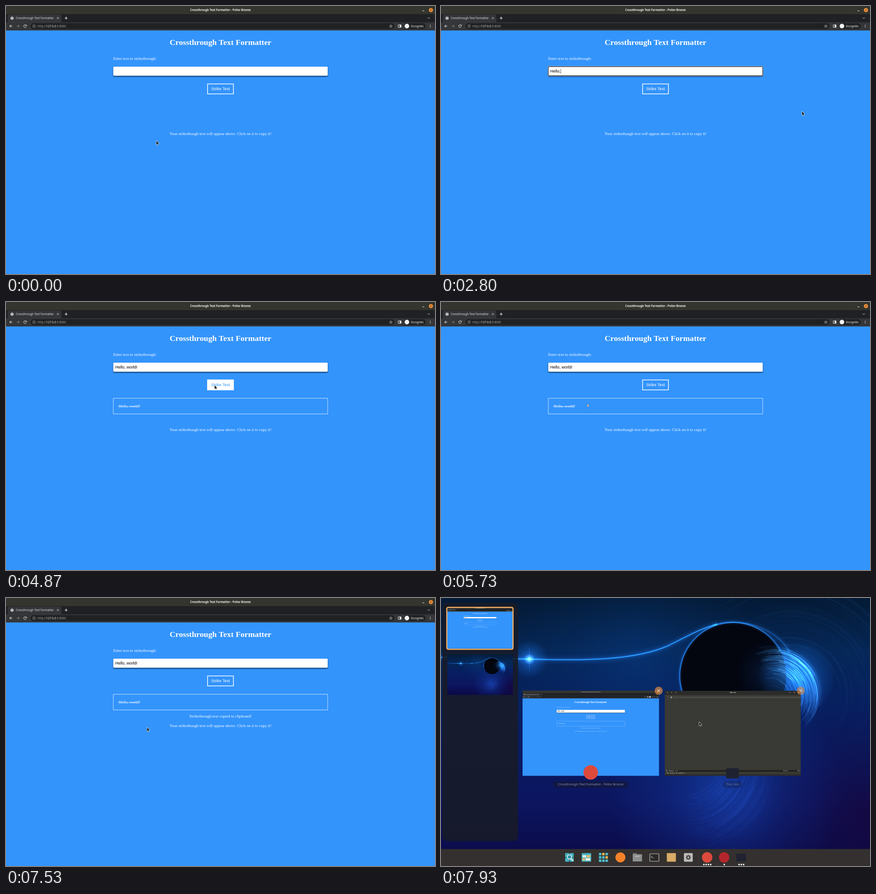
Write an HTML page with a canvas that moves like this. It is 947 px wide and 592 px high and loops after 8000 ms.

```html
<!DOCTYPE html>
<html lang="en">
<head>
<meta charset="utf-8">
<title>Crossthrough Text Formatter</title>
<style>
html, body { margin: 0; width: 100%; height: 100%; overflow: hidden; background: #3394fc; }
canvas { display: block; }
</style>
</head>
<body>
<canvas id="stage" width="947" height="592"></canvas>
<script>
const W = 947, H = 592, LOOP = 8000, TAU = Math.PI * 2;
const K = W / 1920;
const APP = 'Crossthrough Text Formatter';
const WINDOW_TITLE = APP + ' - Pellor Bronze';
const BLUE = '#3394fc', SANS = '"Noto Sans", sans-serif', MONO = '"Noto Sans Mono", monospace';
const BODY = `${18 * K}px "Liberation Serif", serif`;
const FIELD = `${18 * K}px "Liberation Sans", sans-serif`;
const GREETING = 'Hello, world!';
const KEY_TIMES = [2000, 2200, 2270, 2400, 2600, 2800, 2870, 2930, 3070, 3200, 3270, 3400, 3600];
const FOCUS = 730, BLUR = 4800, RESULT = 4870, COPIED = 6330, OVERVIEW = 7570;

const stage = document.getElementById('stage').getContext('2d');
let c = stage;

const clamp = (v, lo = 0, hi = 1) => Math.min(hi, Math.max(lo, v));
const mix = (a, b, p) => a + (b - a) * p;
const smooth = p => p * p * (3 - 2 * p);

function rect(x, y, w, h, fill, r = 0) {
  c.fillStyle = fill;
  c.beginPath();
  c.roundRect(x, y, w, h, r);
  c.fill();
}
function frame(x, y, w, h, color, lw, r = 0) {
  c.strokeStyle = color;
  c.lineWidth = lw;
  c.beginPath();
  c.roundRect(x, y, w, h, r);
  c.stroke();
}
function disc(x, y, r, fill) {
  c.fillStyle = fill;
  c.beginPath();
  c.arc(x, y, r, 0, TAU);
  c.fill();
}
function ring(x, y, r, color, lw, from = 0, to = TAU) {
  c.strokeStyle = color;
  c.lineWidth = lw;
  c.beginPath();
  c.arc(x, y, r, from, to);
  c.stroke();
}
function line(points, color, lw) {
  c.strokeStyle = color;
  c.lineWidth = lw;
  c.beginPath();
  for (let i = 0; i < points.length; i += 2) c.lineTo(points[i], points[i + 1]);
  c.stroke();
}
function text(s, x, y, font, fill, align = 'left') {
  c.font = font;
  c.fillStyle = fill;
  c.textAlign = align;
  c.fillText(s, x, y);
  return c.measureText(s).width;
}
function cross(x, y, s, color, lw) {
  line([x - s, y - s, x + s, y + s], color, lw);
  line([x - s, y + s, x + s, y - s], color, lw);
}
function at(x, y, scale, draw) {
  c.save();
  c.translate(x, y);
  c.scale(scale, scale);
  draw();
  c.restore();
}

// Pointer stops: time, x, y
const PATH = [
  [0, 332, 298], [40, 332, 298], [700, 318, 145], [830, 318, 145], [1330, 797, 233],
  [3950, 797, 233], [4760, 460.5, 184], [5020, 460.5, 184], [5880, 312, 228],
  [6130, 281, 230.5], [6640, 281, 230.5], [7400, 299, 303], [7470, 299.5, 302],
  [7530, 311.5, 286], [7600, 330, 280], [7930, 570, 274], [8000, 570, 274]
];
function pointerAt(t) {
  let i = 1;
  while (i < PATH.length - 1 && t > PATH[i][0]) i++;
  const [a, b] = [PATH[i - 1], PATH[i]];
  const p = smooth(clamp((t - a[0]) / (b[0] - a[0])));
  return { x: mix(a[1], b[1], p), y: mix(a[2], b[2], p) };
}
const inside = (p, x, y, w, h) => p.x > x && p.x < x + w && p.y > y && p.y < y + h;

function drawBrowserFrame() {
  rect(0, 0, W, 18.3, '#34352f');
  text(WINDOW_TITLE, 473.5, 11, '600 6.1px ' + SANS, '#f4f3f0', 'center');
  rect(919.5, 10.2, 4, 1.1, '#f2f2f2');
  disc(938, 9, 4.6, '#f0913a');
  cross(938, 9, 1.5, '#4a3018', 0.8);

  rect(0, 18, W, 18.5, '#202124');
  rect(4, 19, 118, 20, '#35363a', 4);
  disc(13.5, 26.8, 3.4, '#e4e6e9');
  line([11.3, 25, 13, 26.2, 13, 28, 14.5, 29.6], '#35363a', 0.9);
  line([14.2, 24, 14.6, 25.6, 16.6, 26.4], '#35363a', 0.9);
  text(APP, 21.5, 28.9, '6.2px ' + SANS, '#dfe1e5');
  cross(114.5, 26.7, 1.9, '#e8eaed', 0.9);
  line([129.6, 26.7, 136, 26.7], '#f1f3f4', 1.1);
  line([132.8, 23.5, 132.8, 29.9], '#f1f3f4', 1.1);
  line([930.8, 25.5, 933.2, 27.9, 935.6, 25.5], '#e8eaed', 1);

  rect(0, 36, W, 18, '#35363a');
  arrow(11, 44.4, -1, '#f1f3f4');
  arrow(26.5, 44.4, 1, '#85878b');
  ring(42, 44.4, 2.9, '#f1f3f4', 1, 0.5, 5.4);
  line([45.3, 41.2, 45.3, 43.7, 42.8, 43.7], '#f1f3f4', 1);
  rect(54, 38, 803.5, 13, '#202124', 6.5);
  ring(62, 44.4, 3.1, '#b4b7bb', 0.7);
  line([62, 43.9, 62, 46.2], '#b4b7bb', 0.8);
  line([62, 42.4, 62, 43.1], '#b4b7bb', 0.8);
  let x = 69.8;
  for (const [part, color] of [['http://', '#9aa0a6'], ['127.0.0.1', '#f1f3f4'], [':8080', '#9aa0a6']])
    x += text(part, x, 46.7, `${13 * K}px ${SANS}`, color);

  const star = [];
  for (let i = 0; i <= 10; i++) {
    const r = i % 2 ? 1.5 : 3.4, a = i * Math.PI / 5 - Math.PI / 2;
    star.push(849.5 + r * Math.cos(a), 44.6 + r * Math.sin(a));
  }
  line(star, '#d5d7da', 0.7);
  frame(866, 41.7, 6, 5.4, '#f1f3f4', 1);
  rect(869.3, 41.7, 2.9, 5.4, '#f1f3f4');
  rect(878.5, 37.8, 48, 13, '#202124', 6.5);
  disc(885, 44.3, 5.1, '#f1f3f4');
  text('Incognito', 894, 46.6, '6.2px ' + SANS, '#f1f3f4');
  for (const dy of [-2.4, 0, 2.4]) disc(936.5, 44.4 + dy, 0.75, '#f1f3f4');
}
function arrow(x, y, dir, color) {
  line([x - 3 * dir, y, x + 2.8 * dir, y], color, 1);
  line([x, y - 3, x + 3 * dir, y, x, y + 3], color, 1);
}

function drawPage(t, pointer) {
  rect(0, 53.6, W, H - 53.6, BLUE);
  text(APP, 473.5, 86.3, `bold ${36 * K}px "Liberation Serif", serif`, '#fff', 'center');
  text('Enter text to strikethrough:', 236.7, 119.4, BODY, '#fff');

  // Canvas shadows ignore the transform
  const zoom = c.getTransform().a;
  c.save();
  c.shadowColor = 'rgba(0,0,0,.6)';
  c.shadowBlur = 3 * zoom;
  c.shadowOffsetY = 2.2 * zoom;
  rect(236.8, 133.9, 473.4, 20, '#fff', 2);
  c.restore();
  const focused = t >= FOCUS && t < BLUR;
  if (focused) {
    frame(236.8, 133.9, 473.4, 20, '#fff', 2.2, 2);
    frame(236.8, 133.9, 473.4, 20, '#101010', 1.2, 2);
  }
  const typed = KEY_TIMES.filter(k => k <= t);
  const caretX = 241.2 + text(GREETING.slice(0, typed.length), 241.2, 146.7, FIELD, '#000');
  const lastInput = typed.length ? typed[typed.length - 1] : FOCUS;
  if (focused && Math.floor((t - lastInput) / 600) % 2 === 0)
    rect(caretX, 138.8, 0.6, 10, '#000');

  const hover = pointer && inside(pointer, 444.2, 171.6, 58.6, 23.4);
  if (hover) rect(444.2, 171.6, 58.6, 23.4, '#fff');
  frame(444.95, 172.35, 57.1, 21.9, '#fff', 1.5);
  text('Strike Text', 473.5, 186.2, FIELD, hover ? BLUE : '#fff', 'center');

  if (t >= RESULT) {
    frame(236.9, 212.7, 473.2, 34.6, '#fff', 0.75);
    text(GREETING, 248.7, 232.7, BODY, '#fff');
    rect(247, 229.9, 48, 0.7, '#fff');
  }
  if (t >= COPIED) text('Strikethrough text copied to clipboard!', 473.5, 264.4, BODY, '#fff', 'center');
  text('Your strikethough text will appear above. Click on it to copy it!', 473.5, 284.6, BODY, '#fff', 'center');
}
function drawBrowser(t, pointer) {
  drawPage(t, pointer);
  drawBrowserFrame();
}

function drawPointer(p, shape) {
  c.save();
  c.translate(p.x, p.y);
  c.lineJoin = 'round';
  if (shape === 'beam') {
    line([0, -4.5, 0, 4.5], '#fff', 1.6);
    line([0, -4.5, 0, 4.5], '#1a1a1a', 0.8);
    line([-1.6, -4.5, 1.6, -4.5], '#1a1a1a', 0.7);
    line([-1.6, 4.5, 1.6, 4.5], '#1a1a1a', 0.7);
  } else {
    const outline = shape === 'hand'
      ? [0, 0, 0.9, 0.4, 1, 3, 2.6, 3.8, 2.2, 6.4, -0.8, 6.4, -1.7, 4, -0.6, 3.8]
      : [0, 0, 0, 8, 1.8, 6.4, 3.1, 9, 4.3, 8.4, 3.1, 5.9, 5.5, 5.7];
    c.beginPath();
    for (let i = 0; i < outline.length; i += 2) c.lineTo(outline[i], outline[i + 1]);
    c.closePath();
    c.strokeStyle = shape === 'hand' ? '#6b5a58' : '#f2f2f2';
    c.lineWidth = shape === 'hand' ? 0.5 : 1.2;
    c.stroke();
    c.fillStyle = shape === 'hand' ? '#dcb79a' : '#1c1c1c';
    c.fill();
  }
  c.restore();
}

function gradientFill(g, stops) {
  stops.forEach(([at, color]) => g.addColorStop(at, color));
  c.fillStyle = g;
  c.fillRect(0, 0, W, H);
}
function glow(x, y, r, rgb, alpha) {
  gradientFill(c.createRadialGradient(x, y, 0, x, y, r),
    [[0, `rgba(${rgb},${alpha})`], [0.5, `rgba(${rgb},${alpha * 0.35})`], [1, `rgba(${rgb},0)`]]);
}
function arcs(count, draw) {
  for (let i = 0; i < count; i++) {
    const [x, y, r, from, to, color, lw] = draw();
    ring(x, y, r, color, lw, from, to);
  }
}
function makeWallpaper() {
  const canvas = document.createElement('canvas');
  canvas.width = W;
  canvas.height = H;
  c = canvas.getContext('2d');
  let seed = 11;
  const rand = (a = 0, b = 1) => {
    seed = (seed * 16807) % 2147483647;
    return mix(a, b, seed / 2147483647);
  };
  gradientFill(c.createLinearGradient(0, 0, 0, H),
    [[0, '#041a35'], [0.2, '#052656'], [0.42, '#071f60'], [0.75, '#0c1660'], [1, '#0b0945']]);
  glow(430, 130, 260, '10,70,150', 0.35);
  glow(630, 430, 260, '24,75,190', 0.6);
  glow(947, 480, 260, '22,6,60', 0.8);

  c.globalCompositeOperation = 'lighter';
  arcs(60, () => [770, 215, rand(110, 260), rand(-2.3, -1.5), rand(-0.6, 0.6),
    `rgba(40,120,210,${rand(0.015, 0.05)})`, rand(0.4, 1.5)]);
  arcs(90, () => [540, 360, rand(70, 200), rand(-0.2, 0.5), rand(0.8, 1.6),
    `rgba(50,110,220,${rand(0.02, 0.07)})`, rand(0.4, 1.5)]);
  for (const [lw, alpha] of [[20, 0.04], [11, 0.07], [5, 0.14], [2, 0.35], [0.9, 0.4]]) {
    c.strokeStyle = `rgba(45,140,240,${alpha})`;
    c.lineWidth = lw;
    c.beginPath();
    c.moveTo(0, 131);
    c.bezierCurveTo(100, 133, 150, 134, 195, 135);
    c.bezierCurveTo(330, 139, 430, 136, 500, 106);
    c.bezierCurveTo(545, 84, 575, 66, 610, 58);
    c.stroke();
  }
  for (const [lw, alpha] of [[14, 0.04], [6, 0.08], [2, 0.2]]) {
    c.strokeStyle = `rgba(45,140,240,${alpha})`;
    c.lineWidth = lw;
    c.beginPath();
    c.moveTo(600, 60);
    c.bezierCurveTo(660, 40, 740, 65, 770, 120);
    c.stroke();
  }
  glow(195, 135, 42, '40,140,255', 0.5);
  glow(195, 135, 12, '170,225,255', 0.8);
  line([195, 110, 195, 162], 'rgba(70,160,255,.2)', 1);
  c.globalCompositeOperation = 'source-over';

  disc(645, 172, 117, '#03050f');
  glow(725, 165, 75, '12,50,110', 0.5);
  c.globalCompositeOperation = 'lighter';
  for (const [lw, alpha] of [[9, 0.08], [4, 0.16], [1.4, 0.4]])
    ring(645, 172, 118, `rgba(45,140,235,${alpha})`, lw, 2.6, 5.8);
  glow(785, 175, 85, '30,120,215', 0.65);
  arcs(320, () => {
    const spread = Math.sqrt(rand());
    return [735 + rand(-8, 5), 214 + rand(-6, 8), mix(25, 103, spread), rand(-1.95, -0.9), rand(-0.6, 0.75),
      `rgba(60,160,235,${rand(0.03, 0.16)})`, rand(0.4, 1.4)];
  });
  arcs(50, () => {
    const a = rand(-1.5, -0.7);
    return [735, 214, rand(50, 98), a, a + rand(0.15, 0.5), `rgba(150,215,255,${rand(0.1, 0.35)})`, rand(0.4, 1.3)];
  });
  c = stage;
  return canvas;
}
const wallpaper = makeWallpaper();

function drawTerminal(x, y, w) {
  at(x, y, w / 300, () => {
    rect(0, 0, 300, 187.5, '#393935', 1);
    rect(0, 0, 300, 9, '#2b2b29', 1);
    text('Tilix: vim', 150, 5, 'bold 3px ' + SANS, '#ddd', 'center');
    for (const i of [0, 1, 2]) {
      rect(5 + i * 9, 3.2, 2, 1.2, '#aaa');
      rect(275 + i * 10, 3, 1.6, 1.6, '#ccc');
    }
    text('1: vim', 4, 12, '2.4px ' + SANS, '#999');
    rect(14, 12.5, 286, 4.2, '#4a4a45');
    rect(13, 12.5, 2, 4.2, '#b5b5ac');
    text('1', 6, 16, '3.6px ' + MONO, '#b5b5a8');
    rect(0, 175, 300, 4.2, '#22221f');
    text('[No Name] [+]', 1, 178.4, '3.5px ' + MONO, '#deded6');
    text('0,0-1', 262, 178.4, '3.5px ' + MONO, '#deded6');
    text('All', 293, 178.4, '3.5px ' + MONO, '#deded6');
    text('--No lines in buffer--', 1, 182.9, '3.5px ' + MONO, '#deded6');
    rect(0, 184.5, 300, 3, '#2a2a28');
  });
}

const DOCK_ICONS = [
  (x, y) => {
    for (const dx of [-9.5, 0.5]) for (const dy of [-9.5, 0.5]) rect(x + dx, y + dy, 9, 9, '#43b3c2', 1);
    disc(x, y - 1, 5.5, '#e8eef0');
    disc(x, y - 1, 3.8, '#2f8fa0');
    line([x + 3.5, y + 3, x + 8.5, y + 8], '#f2efe8', 2.4);
  },
  (x, y) => {
    rect(x - 10.5, y - 9.5, 21, 19, '#43b3c2', 1.5);
    rect(x - 8.5, y - 5, 8, 5, '#f3eee2');
    rect(x + 1, y - 5, 7.5, 5, '#f5c069');
    rect(x - 8.5, y + 1.5, 5, 5.5, '#f5c069');
    rect(x - 2, y + 1.5, 10.5, 5.5, '#f3eee2');
  },
  (x, y) => {
    for (let i = 0; i < 9; i++)
      rect(x - 10 + (i % 3) * 7.2, y - 10 + Math.floor(i / 3) * 7.2, 5.6, 5.6, i % 4 === 1 ? '#f5b04c' : '#4cbccb', 0.8);
  },
  (x, y) => disc(x, y, 11, '#f5812a'),
  (x, y) => {
    rect(x - 10, y - 9.5, 9, 5, '#6f7372', 1);
    rect(x - 10.3, y - 7, 20.6, 16, '#8c908f', 1);
    rect(x - 5, y - 3.5, 10, 2, '#b7bab9');
  },
  (x, y) => {
    rect(x - 10, y - 8, 20, 16.5, '#2b2928', 1);
    frame(x - 10, y - 8, 20, 16.5, '#c9c8c6', 1.2, 1);
    text('$_', x - 7.5, y + 1, '6px ' + MONO, '#eee');
  },
  (x, y) => rect(x - 10, y - 9.5, 20, 19, '#d9ab68', 1),
  (x, y) => {
    rect(x - 9.7, y - 9.5, 19.4, 19, '#bcbcba', 1.5);
    for (let i = 0; i < 4; i++) {
      const a = i * Math.PI / 4, dx = 5.6 * Math.cos(a), dy = 5.6 * Math.sin(a);
      line([x - dx, y - dy, x + dx, y + dy], '#454341', 2);
    }
    disc(x, y, 4.3, '#454341');
    disc(x, y, 2, '#bcbcba');
  },
  (x, y) => disc(x, y, 11.5, '#dd4a3c'),
  (x, y) => disc(x, y, 11.5, '#b3262d'),
  (x, y) => rect(x - 10.5, y - 8, 21, 17, '#1f2230', 1.5)
];
function drawDock(highlighted) {
  rect(0, 554.5, W, 37.5, '#33302f');
  if (highlighted) rect(569.5, 555.5, 37, 35.5, 'rgba(255,255,255,.18)', 8);
  rect(567, 560, 0.8, 26, '#45413f');
  DOCK_ICONS.forEach((draw, i) => draw(283.5 + i * 37.5 + (i > 7 ? 4 : 0), 573));
  [[587.8, 4], [625.4, 1], [663, 3]].forEach(([x, n]) => {
    for (let i = 0; i < n; i++) disc(x + (i - (n - 1) / 2) * 5, 588.8, 1.8, '#fff');
  });
}

function caption(s, x, halfWidth, alpha, back) {
  c.globalAlpha = back;
  rect(x - halfWidth, 404.5, halfWidth * 2, 15, 'rgba(22,24,50,.6)', 7);
  c.globalAlpha = alpha;
  text(s, x, 414.3, '7px ' + SANS, '#b4b8cc', 'center');
  c.globalAlpha = 1;
}
function closeButton(x, y, alpha) {
  c.globalAlpha = alpha;
  disc(x, y, 9, '#e08a45');
  cross(x, y, 2.8, '#fff', 1.1);
  c.globalAlpha = 1;
}
function drawOverview(t) {
  const p = smooth(clamp((t - 7600) / 300));
  c.drawImage(wallpaper, 0, 0);
  rect(3, 10, 167, 527, 'rgba(24,27,40,.9)', 11);
  at(14, 21.5, 144.5 / W, () => drawBrowser(t));
  frame(12.8, 20.8, 146.2, 92.4, '#f6b061', 2.4, 3);
  c.drawImage(wallpaper, 14, 124, 144.5, 144.5 * H / W);

  const top = mix(205.2, 204.4, p);
  at(mix(181.3, 180, p), top, mix(298.8, 301.2, p) / W, () => drawBrowser(t));
  drawTerminal(mix(495.3, 494, p), top + 0.5, mix(297.5, 300, p));
  disc(330.5, 385.3, 16, '#dd4a3c');
  rect(629.5, 376, 28, 22.5, '#1f2230', 2);

  caption(WINDOW_TITLE, 330.5, 83, mix(0.18, 0.75, p), p);
  caption('Tilix: vim', 643.5, 21.5, p * 0.55, p * 0.5);
  closeButton(480.5, 204.8, mix(0.15, 0.7, p));
  closeButton(794, 204.8, p * 0.6);
  drawDock(t < 7700);
}

function render(t) {
  const pointer = pointerAt(t);
  if (t >= OVERVIEW) {
    drawOverview(t);
    drawPointer(pointer, 'arrow');
    return;
  }
  drawBrowser(t, pointer);
  const overField = inside(pointer, 236.8, 133.9, 473.4, 20);
  const overResult = t >= RESULT && inside(pointer, 236.8, 212.5, 473.4, 35);
  drawPointer(pointer, overField ? 'beam' : overResult ? 'hand' : 'arrow');
}
const start = performance.now();
function tick() {
  render((performance.now() - start) % LOOP);
  requestAnimationFrame(tick);
}
tick();
</script>
</body>
</html>
```
